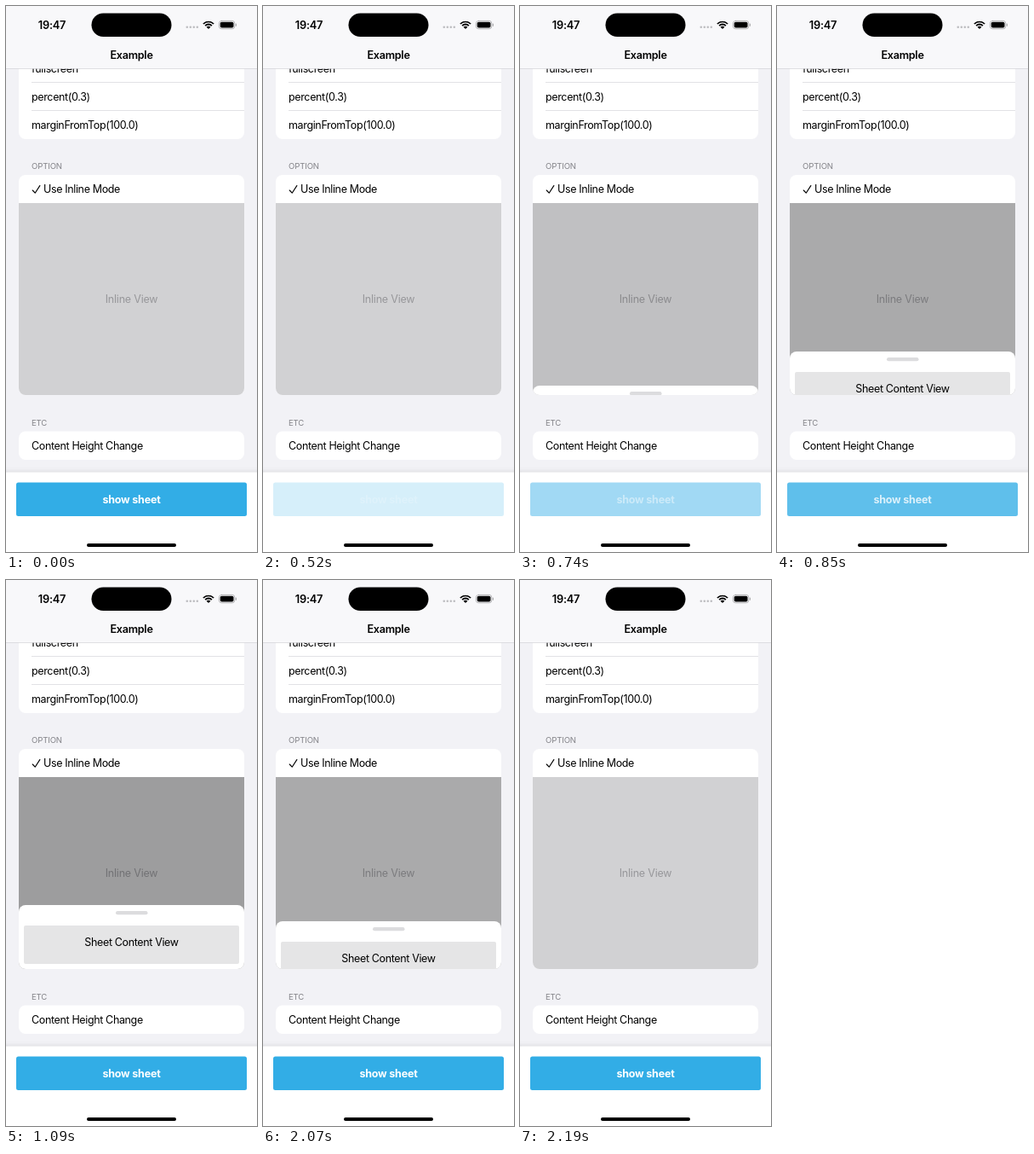
An HTML page with a canvas that plays this animation: 295 px wide and 640 px high, repeating every 3.32 s.

```html
<!DOCTYPE html>
<html lang="en">
<head>
<meta charset="utf-8">
<title>Inline sheet</title>
<style>
html, body { margin: 0; width: 100%; height: 100%; overflow: hidden; background: #f2f2f6; }
canvas { display: block; width: 295px; height: 640px; }
</style>
</head>
<body>
<canvas id="stage"></canvas>
<script>
const W = 295, H = 640, LOOP = 3320;
const canvas = document.getElementById('stage');
const ratio = window.devicePixelRatio || 1;
canvas.width = W * ratio;
canvas.height = H * ratio;
const c = canvas.getContext('2d');
c.scale(ratio, ratio);

// Each pose holds until the next: time, sheet height, dimming, button opacity
const poses = [
  [0, 0, 0, 1],
  [520, 0, 0, 0.2],
  [740, 11, 0.083, 0.46],
  [850, 51, 0.19, 0.78],
  [970, 72, 0.238, 0.96],
  [1090, 75, 0.25, 1],
  [2070, 56, 0.187, 1],
  [2190, 0, 0, 1]
];

function box(x, y, w, h, r, color) {
  c.fillStyle = color;
  c.beginPath();
  c.roundRect(x, y, w, h, r);
  c.fill();
}

function text(s, x, y, o = {}) {
  const { size = 12.5, weight = 400, color = '#000', align = 'left', track = -0.36 } = o;
  c.font = `${weight} ${size}px Inter, Roboto, sans-serif`;
  c.letterSpacing = track + 'px';
  c.textAlign = align;
  c.textBaseline = 'alphabetic';
  c.fillStyle = color;
  c.fillText(s, x, y);
}

function wifi() {
  c.save();
  c.beginPath();
  c.moveTo(238, 27);
  c.arc(238, 27, 9.6, -Math.PI * 0.75, -Math.PI * 0.25);
  c.closePath();
  c.clip();
  c.strokeStyle = '#000';
  c.lineWidth = 1.8;
  for (const r of [8.6, 5.5]) {
    c.beginPath();
    c.arc(238, 27, r, -Math.PI, 0);
    c.stroke();
  }
  c.fillStyle = '#000';
  c.beginPath();
  c.arc(238, 27, 3.2, 0, 7);
  c.fill();
  c.restore();
}

function header() {
  box(0, 0, W, 73, 0, '#f8f8fa');
  box(0, 73, W, 0.7, 0, '#d4d4d8');
  text('19:47', 54, 26.5, { size: 12.8, weight: 600, align: 'center', track: -0.2 });
  box(100.5, 8.5, 94, 27.5, 13.75, '#000');
  for (let i = 0; i < 4; i++) box(211.5 + i * 4, 23.5, 2.6, 2.6, 1.3, '#bdbdc0');
  wifi();
  c.strokeStyle = '#a4a4a6';
  c.lineWidth = 0.8;
  c.beginPath();
  c.roundRect(250.4, 17.4, 18.4, 9.4, 3);
  c.stroke();
  box(251.7, 18.7, 15.8, 6.8, 1.8, '#000');
  box(269.8, 20.5, 1.1, 3.2, 0.6, '#a4a4a6');
  text('Example', 147.5, 61.5, { size: 12.6, weight: 600, align: 'center', track: -0.25 });
}

function list() {
  const label = { size: 9.6, color: '#85858a', track: -0.15 };
  box(15, 40, 265, 116, 8, '#fff');
  for (const y of [89, 122]) box(30, y, 250, 0.7, 0, '#d9d9dc');
  text('fullscreen', 30, 77.7);
  text('percent(0.3)', 30, 110.7);
  text('marginFromTop(100.0)', 30, 143.7);

  text('OPTION', 30, 190.8, label);
  box(15, 198, 265, 258, 8, '#fff');
  c.strokeStyle = '#000';
  c.lineWidth = 1.15;
  c.lineCap = c.lineJoin = 'round';
  c.beginPath();
  c.moveTo(31.2, 216);
  c.lineTo(34.2, 219.2);
  c.lineTo(39.8, 210.6);
  c.stroke();
  text('Use Inline Mode', 44, 219.2);

  text('ETC', 30, 491.8, label);
  box(15, 498.5, 265, 33.5, 8, '#fff');
  text('Content Height Change', 30, 519.9);
}

function inlineView(height, dim) {
  c.save();
  c.beginPath();
  c.roundRect(15, 231, 265, 225, [0, 0, 8, 8]);
  c.clip();
  box(15, 231, 265, 225, 0, '#d1d1d3');
  text('Inline View', 147.5, 348.3, { color: '#97979a', align: 'center', track: -0.2 });
  box(15, 231, 265, 225, 0, `rgba(0,0,0,${dim})`);
  if (height > 0) {
    const top = 456 - height;
    box(15, top, 265, 90, [8, 8, 0, 0], '#fff');
    box(129, top + 7, 37.5, 4.3, 2.15, '#dcdcde');
    box(21, top + 24, 253, 45, 2, '#e5e5e6');
    text('Sheet Content View', 147.5, top + 48.3, { align: 'center' });
  }
  c.restore();
}

function footer(alpha) {
  c.save();
  c.shadowColor = 'rgba(0,0,0,0.18)';
  c.shadowBlur = 7 * ratio;
  box(-10, 546.5, W + 20, 110, 0, '#fff');
  c.restore();
  c.globalAlpha = alpha;
  box(12, 558.5, 271, 39.5, 2.5, '#32ade6');
  text('show sheet', 147.5, 582.8, { weight: 700, color: '#fff', align: 'center', track: -0.2 });
  c.globalAlpha = 1;
  box(95, 630, 105, 4, 2, '#000');
}

function draw(t) {
  const [, height, dim, alpha] = poses.findLast(p => p[0] <= t);
  box(0, 0, W, H, 0, '#f2f2f6');
  list();
  inlineView(height, dim);
  header();
  footer(alpha);
}

const start = performance.now();
function tick() {
  draw((performance.now() - start) % LOOP);
  requestAnimationFrame(tick);
}
tick();
</script>
</body>
</html>
```
